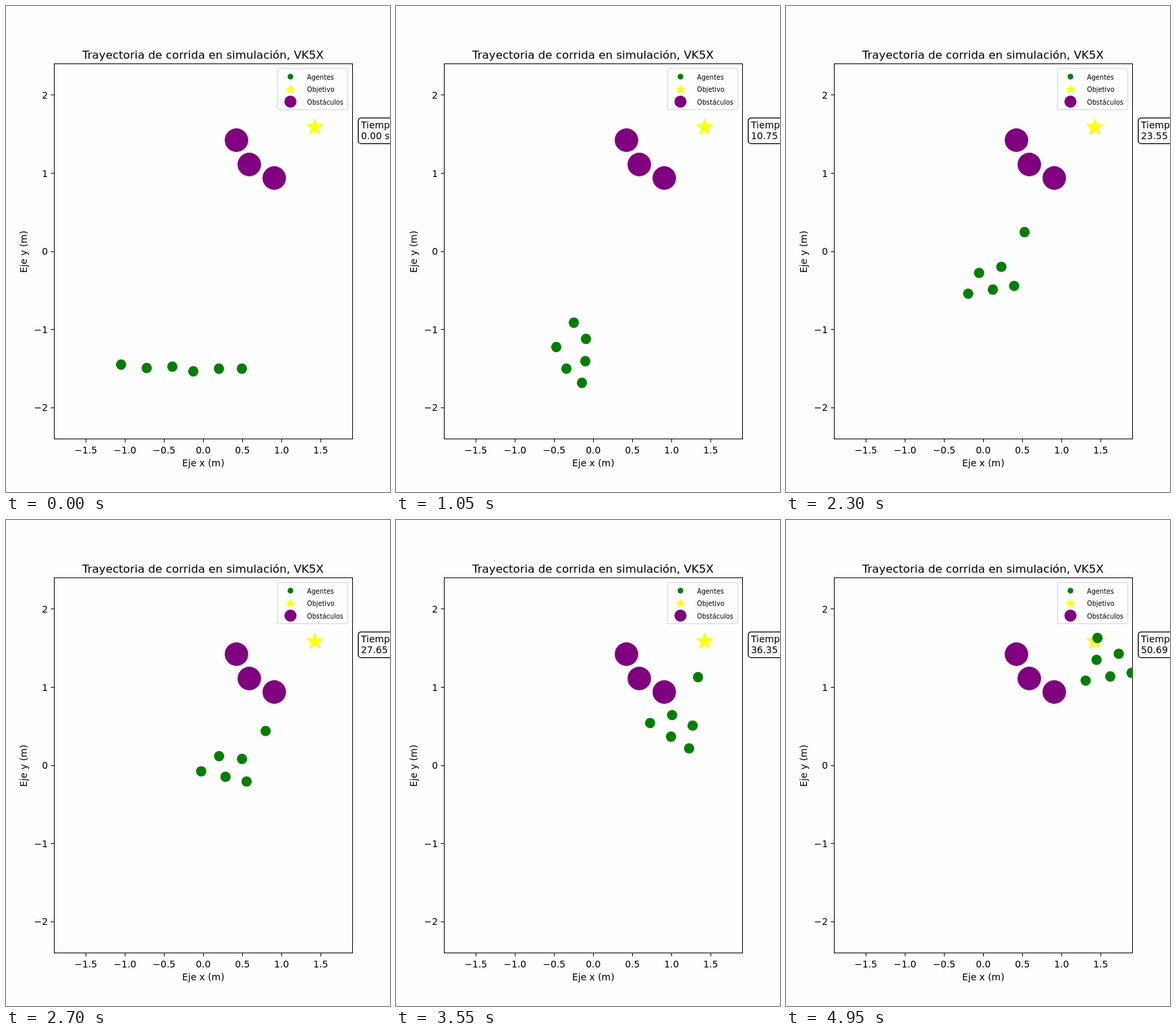
An HTML page that plays this animation: 569 by 719 pixels, repeating every 5 s.

```html
<!DOCTYPE html>
<html lang="es">
<head>
<meta charset="utf-8">
<title>Trayectoria</title>
<style>
  html, body { margin: 0; width: 100%; height: 100%; overflow: hidden; background: #fefefe; }
  svg { display: block; font: 13.89px "DejaVu Sans", sans-serif; }
  .small { font-size: 9.72px; }
  .title { font-size: 16.67px; }
  .mid { text-anchor: middle; }
  .end { text-anchor: end; }
</style>
</head>
<body>
<svg width="569" height="719" viewBox="0 0 569 719">
  <clipPath id="area"><rect x="71" y="85" width="443" height="556"/></clipPath>
  <g id="axes" fill="none" stroke="#000"><rect x="71.5" y="85.5" width="442" height="555"/></g>
  <g id="scene" clip-path="url(#area)"></g>
  <g id="labels">
    <text class="title" x="113" y="78">Trayectoria de corrida en simulación, VK5X</text>
    <text class="mid" x="292.3" y="681">Eje x (m)</text>
    <text class="mid" transform="translate(31 363.5) rotate(-90)">Eje y (m)</text>
  </g>
  <g id="legend">
    <rect x="402.5" y="92.5" width="104" height="61" rx="2.5" fill="#fefefe" stroke="#d4d4d4"/>
    <text class="small" x="446" y="108.5">Agentes</text>
    <text class="small" x="446" y="127">Objetivo</text>
    <text class="small" x="446" y="146">Obstáculos</text>
  </g>
  <rect x="522" y="165.6" width="66" height="38" rx="4.2" fill="#fefefe" stroke="#000" stroke-width="1.39"/>
  <text x="526" y="181">Tiempo</text>
  <text id="clock" x="526" y="197"></text>
</svg>
<script>
const FRAMES = 100, STEP = 50, DT = 0.512;
const GATHER = 21, FORMED = 46;
const $ = id => document.getElementById(id);

function add(parent, tag, attrs, text) {
  const el = document.createElementNS("http://www.w3.org/2000/svg", tag);
  for (const k in attrs) el.setAttribute(k, attrs[k]);
  if (text) el.textContent = text;
  parent.appendChild(el);
  return el;
}

const dot = (parent, cx, cy, r, fill) => add(parent, "circle", { cx, cy, r, fill });

function star(parent, cx, cy, r) {
  const points = Array.from({ length: 10 }, (_, i) => {
    const a = i * Math.PI / 5, q = i % 2 ? r * 0.382 : r;
    return [cx + q * Math.sin(a), cy - q * Math.cos(a)].map(v => v.toFixed(2));
  }).join(" ");
  add(parent, "polygon", {
    points, fill: "#ff0", stroke: "#ff0", "stroke-width": 1.39, "stroke-linejoin": "bevel"
  });
}

// Axis ticks
const num = (v, d) => v.toFixed(d).replace("-", "\u2212");
for (let i = -3; i <= 3; i++) {
  const x = 292.5 + i * 58;
  add($("axes"), "path", { d: `M${x} 641v4.5` });
  add($("labels"), "text", { x: x - 0.2, y: 662, class: "mid" }, num(i / 2, 1));
}
for (let i = -2; i <= 2; i++) {
  const y = 363 - i * 115.6;
  add($("axes"), "path", { d: `M71 ${Math.floor(y) + 0.5}h-4.5` });
  add($("labels"), "text", { x: 62, y: y + 5.2, class: "end" }, num(i, 0));
}

// Legend markers
dot($("legend"), 421.5, 104.5, 4.2, "green");
star($("legend"), 421.5, 123.5, 6.25);
dot($("legend"), 421.5, 141.5, 9, "purple");

// Obstacles and goal
for (const [x, y] of [[341.5, 198.5], [360.5, 234.5], [397.5, 254.5]])
  dot($("scene"), x, y, 17.4, "purple");
star($("scene"), 457.5, 179.5, 12.5);

// Each agent: start, gathering point, and polar slot in the triangle; the leader has none
const agents = [
  { start: [170, 530], gather: [237, 504], slot: [32, -120] },
  { start: [208, 535], gather: [252, 536], slot: [37, 180] },
  { start: [246, 533], gather: [263, 468] },
  { start: [277, 540], gather: [275, 557], slot: [32, 0] },
  { start: [315, 536], gather: [280, 525], slot: [0, 0] },
  { start: [349, 536], gather: [281, 492], slot: [36, -60] }
];
for (const agent of agents) agent.el = dot($("scene"), 0, 0, 7.64, "green");

// Route of the triangle (centre, heading in degrees) and of the leader
const route = [
  { t: FORMED, pose: [306, 419, -9.5], lead: [353, 334] },
  { t: 62, pose: [349, 343, 31.5], lead: [415, 285] },
  { t: 71, pose: [407, 320, 33], lead: [447, 232] },
  { t: 77, pose: [451, 304, 25], lead: [457, 211] },
  { t: 87, pose: [485, 262, 11], lead: [465, 190] },
  { t: 99, pose: [480, 231, -9.5], lead: [461, 174] }
];

const mix = (a, b, u) => a.map((v, i) => v + (b[i] - v) * u);

// Cubic Hermite curve through unevenly spaced route points
function along(t, part) {
  const last = route.length - 1;
  let i = 0;
  while (i < last - 1 && t >= route[i + 1].t) i++;
  const p = route[i], q = route[i + 1], h = q.t - p.t, u = (t - p.t) / h, v = 1 - u;
  return p[part].map((start, k) => {
    const slope = j => {
      const a = route[Math.max(j - 1, 0)], b = route[Math.min(j + 1, last)];
      return (b[part][k] - a[part][k]) / (b.t - a.t);
    };
    return start * v * v * (1 + 2 * u) + q[part][k] * u * u * (3 - 2 * u)
      + h * u * v * (slope(i) * v - slope(i + 1) * u);
  });
}

function inFormation({ slot }, t) {
  if (!slot) return along(t, "lead");
  const [x, y, heading] = along(t, "pose");
  const a = (heading + slot[1]) * Math.PI / 180;
  return [x + slot[0] * Math.cos(a), y + slot[0] * Math.sin(a)];
}

// Drift together, speed up into formation, then travel as a group
function position(agent, t) {
  if (t < GATHER) return mix(agent.start, agent.gather, t / GATHER);
  if (t >= FORMED) return inFormation(agent, t);
  const u = (t - GATHER) / (FORMED - GATHER);
  return mix(agent.gather, inFormation(agent, FORMED), u * u);
}

function draw() {
  const n = Math.floor(performance.now() / STEP) % FRAMES;
  for (const agent of agents) {
    const [x, y] = position(agent, n);
    agent.el.setAttribute("cx", x + 0.5);
    agent.el.setAttribute("cy", y + 0.5);
  }
  $("clock").textContent = (n * DT).toFixed(2) + " s";
  requestAnimationFrame(draw);
}
draw();
</script>
</body>
</html>
```
